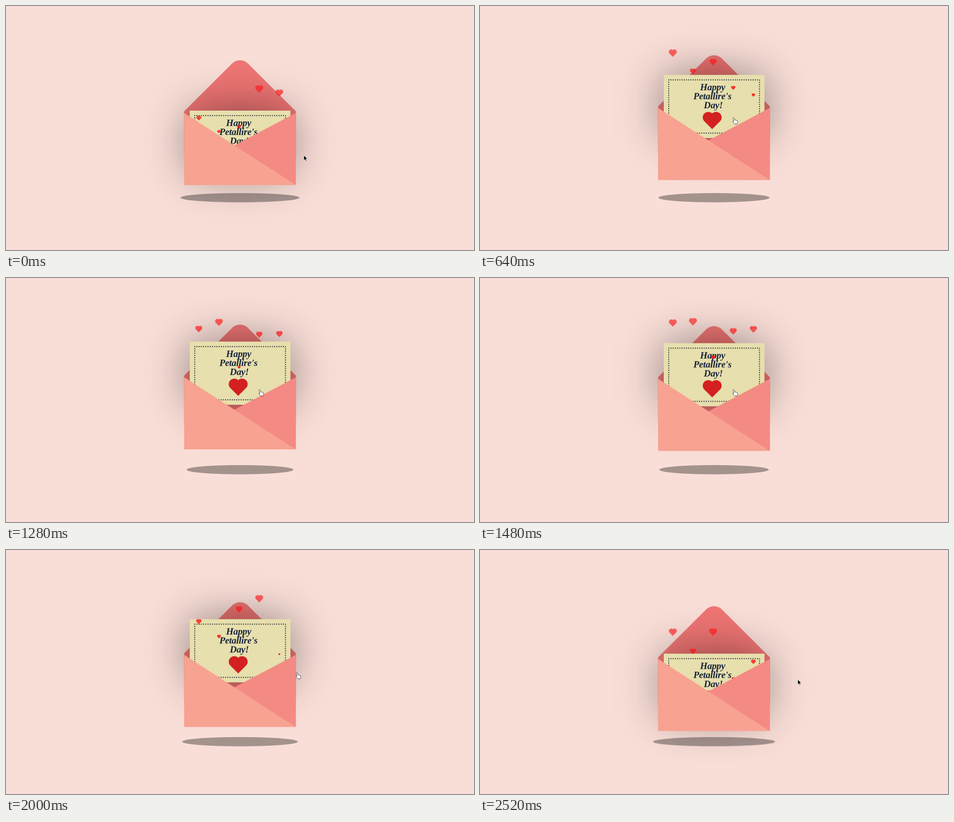
Animation, 1034 px wide and 541 px high, one loop 2.56 s. Source, as an HTML page:

```html
<!DOCTYPE html>
<html lang="en">
<head>
<meta charset="utf-8">
<title>Greeting envelope</title>
<style>
  html, body { margin: 0; width: 100%; height: 100%; overflow: hidden; background: #f9ded7; }
  svg { display: block; width: 100vw; height: 100vh; }

  .envelope, .card, .ground, .cursor, .hand, .arrow, .floating {
    animation: 2560ms linear infinite;
  }
  .envelope { animation-name: float; }
  .card { animation-name: slide; }
  .ground { animation-name: ground; fill: rgba(0, 0, 0, .34); }
  .cursor { animation-name: point; }
  .hand { animation-name: over; animation-timing-function: step-end; }
  .arrow { animation-name: out; animation-timing-function: step-end; }
  .floating { fill: #fa1818; }

  .greeting {
    font: italic bold 21px "Liberation Serif", "Noto Serif", serif;
    letter-spacing: -.3px;
    text-anchor: middle;
    fill: #17233a;
  }
  .dots {
    fill: none;
    stroke: #222b35;
    stroke-width: 2.4;
    stroke-linecap: round;
    stroke-dasharray: 0 4.9;
  }

  @keyframes float {
    0% { transform: translate(393.5px, 397px); }
    44.3% { transform: translate(393.5px, 377.5px); }
    100% { transform: translate(393.5px, 402px); }
  }
  @keyframes ground {
    0% { transform: translate(517px, 425px) scale(1, 1); }
    44.3% { transform: translate(517px, 425px) scale(.884, 1); }
    100% { transform: translate(517px, 425px) scale(1.03, 1); }
  }
  @keyframes slide {
    0% { transform: translateY(-165px); }
    9.3% { transform: translateY(-165px); animation-timing-function: ease; }
    33.1% { transform: translateY(-239px); }
    /* the way back is cut short by the loop */
    83.2% { transform: translateY(-239px); animation-timing-function: cubic-bezier(.3, .09, .35, .79); }
    100% { transform: translateY(-169.1px); }
  }
  @keyframes point {
    0%, 3.1% { transform: translate(658px, 331px); }
    9.3% { transform: translate(606px, 289px); }
    10.9% { transform: translate(576px, 264px); }
    15.6%, 71.9% { transform: translate(560px, 247px); }
    78.1% { transform: translate(642px, 271px); }
    82.8% { transform: translate(648px, 273px); }
    87.5%, 100% { transform: translate(702px, 287px); }
  }
  @keyframes over {
    0% { opacity: 0; }
    9.3% { opacity: 1; }
    83.2%, 100% { opacity: 0; }
  }
  @keyframes out {
    0% { opacity: 1; }
    9.3% { opacity: 0; }
    83.2%, 100% { opacity: 1; }
  }
</style>
</head>
<body>
<svg viewBox="0 0 1034 541">
  <defs>
    <path id="heart" d="M0 .707L-.707 0A.5 .5 0 0 1 0 -.707A.5 .5 0 0 1 .707 0Z"/>
    <filter id="blur" filterUnits="userSpaceOnUse" x="-150" y="-160" width="550" height="460">
      <feGaussianBlur stdDeviation="50"/>
    </filter>
  </defs>

  <g class="envelope">
    <path fill="#ee7574" d="M0 -163.5L105.8 -269.3A25 25 0 0 1 141.2 -269.3L247 -163.5V-60H0Z"/>
    <g class="card">
      <rect x="12.5" width="222.5" height="140" fill-opacity=".45" filter="url(#blur)"/>
      <rect x="12.5" width="222.5" height="140" fill="#e7dfad"/>
      <rect class="dots" x="23.5" y="11" width="200.5" height="118"/>
      <g class="greeting">
        <text x="120.5" y="34">Happy</text>
        <text x="120" y="54">Petallire's</text>
        <text x="122" y="74.5">Day!</text>
      </g>
      <use href="#heart" fill="#d32020" transform="translate(119.5 102.8) scale(24.6)"/>
      <g id="hearts"></g>
    </g>
    <path fill="#f48a84" d="M247 -160V0L0 -29Z"/>
    <path fill="#f8a292" d="M0 -160L247 0H0Z"/>
  </g>

  <ellipse class="ground" rx="131.5" ry="10.2"/>

  <g class="cursor">
    <path class="arrow" stroke="#fff" stroke-width=".8"
      d="M0 0V11.5L2.7 9L4.5 13L6.3 12.2L4.6 8.3H8Z"/>
    <path class="hand" fill="#fff" stroke="#222" stroke-width=".9" stroke-linejoin="round"
      transform="translate(-2.5 0)"
      d="M2 1.2q1.3-1 2.2.5l1.6 4.2q.9-.7 1.8.2q1-.5 1.7.5q1.3-.3 1.7 1l.6 3q.1 1.8-.9 3v1h-5.6l-.8-1q-2-2-3-4.3q-.6-1.6 1.2-1.2l1 .8L1.5 2.8Q1.3 1.8 2 1.2z"/>
  </g>
</svg>
<script>
  const LOOP = 2560, STEPS = 64;
  // [cycle in ms, phase when the loop begins]
  const cycles = [[965, .335], [1915, .165], [1442, .222], [2200, .974], [1632, .783]];

  // cubic-bezier(0, 0, .58, 1)
  function easeOut(x) {
    let lo = 0, hi = 1;
    for (let i = 0; i < 24; i++) {
      const s = (lo + hi) / 2;
      if (s * s * (1.74 - .74 * s) < x) lo = s; else hi = s;
    }
    return lo * lo * (3 - 2 * lo);
  }

  function pose(x, phase) {
    const e = easeOut(phase);
    const y = 80 - 127.5 * e;
    const size = 10.5 * (.22 + .78 * e);
    return `transform:translate(${x}px,${y.toFixed(2)}px) scale(${size.toFixed(3)});` +
      `opacity:${(1 - .36 * e).toFixed(3)};`;
  }

  function rise(name, x, [cycle, start]) {
    let css = "";
    for (let i = 0; i <= STEPS; i++) {
      const phase = (start + i * LOOP / STEPS / cycle) % 1;
      const wraps = phase + LOOP / STEPS / cycle >= 1;
      css += `${i * 100 / STEPS}%{${pose(x, phase)}` +
        `animation-timing-function:${wraps ? "step-end" : "linear"}}`;
    }
    return `@keyframes ${name}{${css}}`;
  }

  const sheet = document.createElement("style");
  const hearts = document.getElementById("hearts");
  cycles.forEach((c, i) => {
    const heart = document.createElementNS("http://www.w3.org/2000/svg", "use");
    heart.setAttribute("href", "#heart");
    heart.setAttribute("class", "floating");
    heart.style.animationName = "rise" + i;
    sheet.textContent += rise("rise" + i, 32.5 + 44.5 * i, c);
    hearts.append(heart);
  });
  document.head.append(sheet);
</script>
</body>
</html>
```
